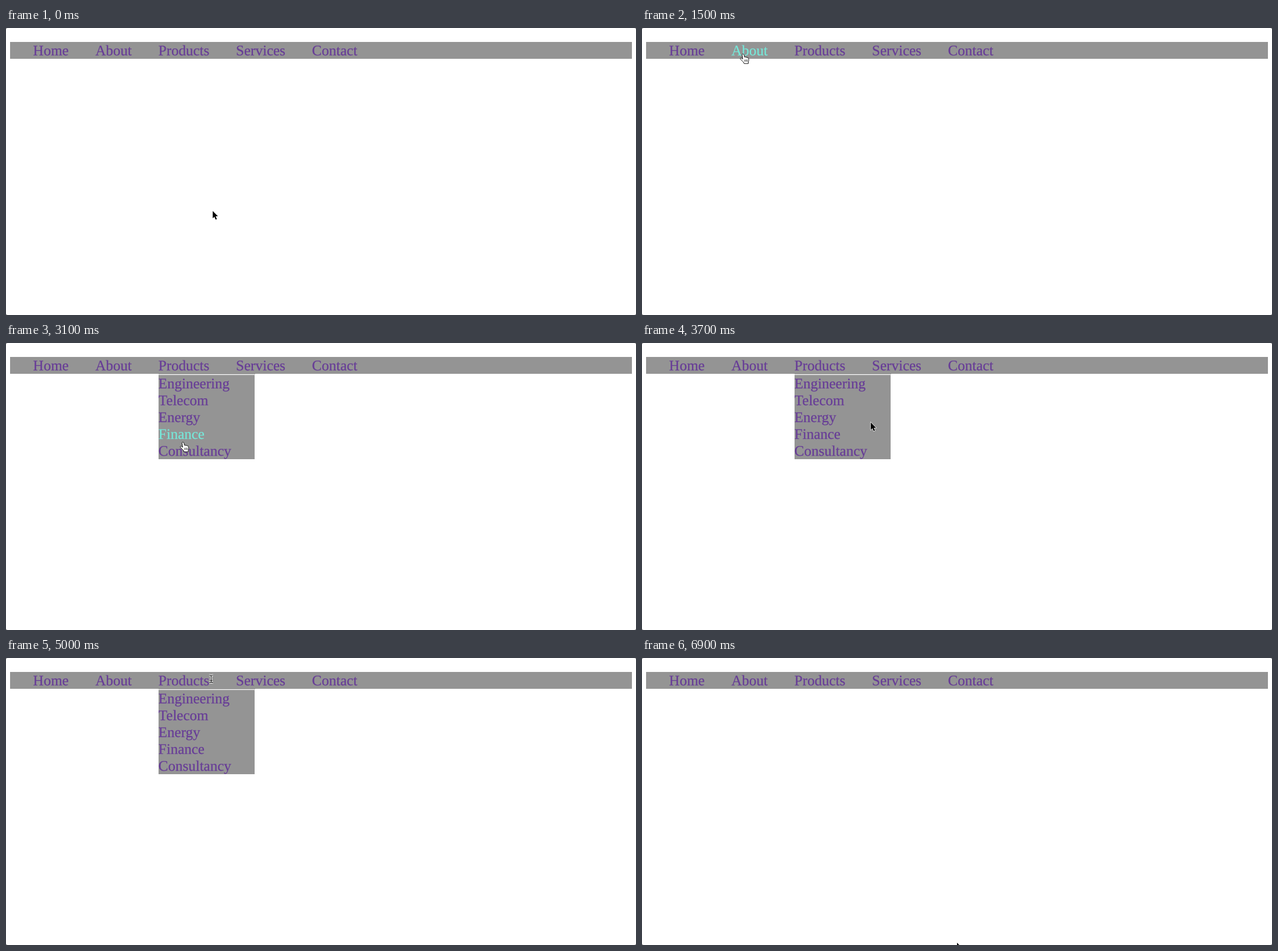
Recreate the animation shown at these times as an HTML page. Size 1082 by 494 pixels, loop 7000 ms.

```html
<!DOCTYPE html>
<html lang="en">
<head>
<meta charset="utf-8">
<title>Dropdown menu</title>
<style>
  html, body { margin: 0; width: 100%; height: 100%; overflow: hidden; background: #fff; }
  svg { display: block; }
  text {
    font: 25px "Liberation Serif", "Times New Roman", serif;
    text-rendering: geometricPrecision;
    fill: #673c97; stroke: #673c97; stroke-width: .25;
  }
  text.hover { fill: #76e8d9; stroke: #76e8d9; }
</style>
</head>
<body>
<svg id="stage" width="1082" height="494" viewBox="0 0 1082 494">
  <defs>
    <path id="beamShape" d="M-3.5-6.5Q0-6.5 0-4.5 0-6.5 3.5-6.5M0-5V5M-3.5 6.5Q0 6.5 0 4.5 0 6.5 3.5 6.5M-2 2.5H2"/>
  </defs>
  <path fill="#777" d="M0 0H3Q0 0 0 3ZM1082 0V3Q1082 0 1079 0ZM0 494V491Q0 494 3 494ZM1082 494H1079Q1082 494 1082 491Z"/>
  <rect x="7" y="24" width="1068" height="29" fill="#949494"/>
  <g id="bar"></g>
  <g id="menu">
    <rect x="262" y="53" width="166" height="1" fill="#a8a8a8"/>
    <rect x="262" y="55" width="165" height="145" fill="#949494"/>
  </g>
  <g id="pointer">
    <path id="arrow" d="M0 0V12.6L2.9 9.9 5 14.8 7.2 13.9 5.1 9.1H9Z" stroke="#fff" stroke-width="1.2" paint-order="stroke"/>
    <g id="hand" stroke="#111" stroke-linejoin="round" fill="#fff">
      <path d="M-2.2 1.6Q-2.4-.2-.8-.4 .5-.4 1 1.3L2.1 5.2Q3.6 4.2 4.6 5.5 6 4.7 6.8 6.1 8.6 5.7 9 7.6 9.7 10.5 8.5 13V16.2H1.2Q.6 13.7-1.4 12.3L-5 8.6Q-5.9 7-4.3 6.6-3 6.6-1.1 8.4Z"/>
      <path fill="none" stroke-width=".8" d="M2.3 9.5V13M4.5 9.3V13M6.6 9.2V13"/>
    </g>
    <g id="beam" fill="none">
      <use href="#beamShape" stroke="#fff" stroke-width="3"/>
      <use href="#beamShape" stroke="#111" stroke-width="1.1"/>
    </g>
  </g>
</svg>
<script>
const LOOP = 7000, STEP = 100;
const ROW = 29, BAR_TOP = 24, MENU_TOP = 55, GAP = 45.8, SLACK = 8;
const byId = id => document.getElementById(id);
const menu = byId('menu'), pointer = byId('pointer');
const shapes = ['arrow', 'hand', 'beam'].map(byId);

function addLink(parent, label, x, top) {
  const el = document.createElementNS('http://www.w3.org/2000/svg', 'text');
  el.setAttribute('x', x);
  el.setAttribute('y', top + 23);
  el.textContent = label;
  parent.append(el);
  return { el, x, top, width: el.getComputedTextLength() };
}

let nextX = 46.6;
const bar = ['Home', 'About', 'Products', 'Services', 'Contact'].map(label => {
  const link = addLink(byId('bar'), label, nextX, BAR_TOP);
  nextX += link.width + GAP;
  return link;
});
const [home, about, products, services, contact] = bar;
const items = ['Engineering', 'Telecom', 'Energy', 'Finance', 'Consultancy']
  .map((label, i) => addLink(menu, label, products.x, MENU_TOP + i * ROW));
const finance = items[3], consultancy = items[4];

// A point on a link: share of its width, and pixels below its top
const on = (link, share, drop) => ({ x: link.x + link.width * share, y: link.top + drop });

const stops = [
  { t: 0, x: 355, y: 315 },
  { t: 800, ...on(home, .4, 32) },
  { t: 1000, ...on(home, .5, 20) },
  { t: 1500, ...on(about, .33, 21) },
  { t: 2100, ...on(products, .44, 20) },
  { t: 2300, ...on(products, .44, 20) },
  { t: 3100, ...on(finance, .54, ROW) },
  { t: 3400, ...on(consultancy, .4, 15) },
  { t: 3900, x: 447, y: 104 },
  { t: 4200, ...on(services, .64, 17) },
  { t: 4600, ...on(contact, .44, 18) },
  { t: 5000, ...on(products, 1.035, 12) },
  { t: 5300, ...on(products, .7, 20) },
  { t: 6100, ...on(finance, .91, 24) },
  { t: 6300, ...on(consultancy, .7, 15) },
  { t: LOOP - STEP, x: 541, y: 490 }
];

function pointerAt(t) {
  const i = stops.findIndex((stop, n) => n > 0 && t <= stop.t);
  const a = stops[i - 1], b = stops[i];
  const k = (t - a.t) / (b.t - a.t);
  return { x: a.x + (b.x - a.x) * k, y: a.y + (b.y - a.y) * k };
}

const within = (p, x, top, width, height) =>
  p.x >= x && p.x <= x + width && p.y > top && p.y <= top + height;
const touches = (p, link, slack = 0) => within(p, link.x, link.top, link.width + slack, ROW);

function render(time) {
  const p = pointerAt(Math.floor(time % LOOP / STEP) * STEP);
  const open = touches(p, products, SLACK) || within(p, 262, 53, 165, 147);
  const links = open ? bar.concat(items) : bar;
  const hovered = links.find(link => touches(p, link));
  const nearText = links.some(link => touches(p, link, SLACK));

  menu.style.display = open ? '' : 'none';
  for (const link of bar.concat(items)) link.el.classList.toggle('hover', link === hovered);
  const shape = hovered ? 1 : nearText ? 2 : 0;
  shapes.forEach((el, i) => { el.style.display = i === shape ? '' : 'none'; });
  pointer.setAttribute('transform', `translate(${p.x} ${p.y})`);
}

const start = performance.now();
function tick() {
  render(performance.now() - start);
  requestAnimationFrame(tick);
}
tick();
</script>
</body>
</html>
```
